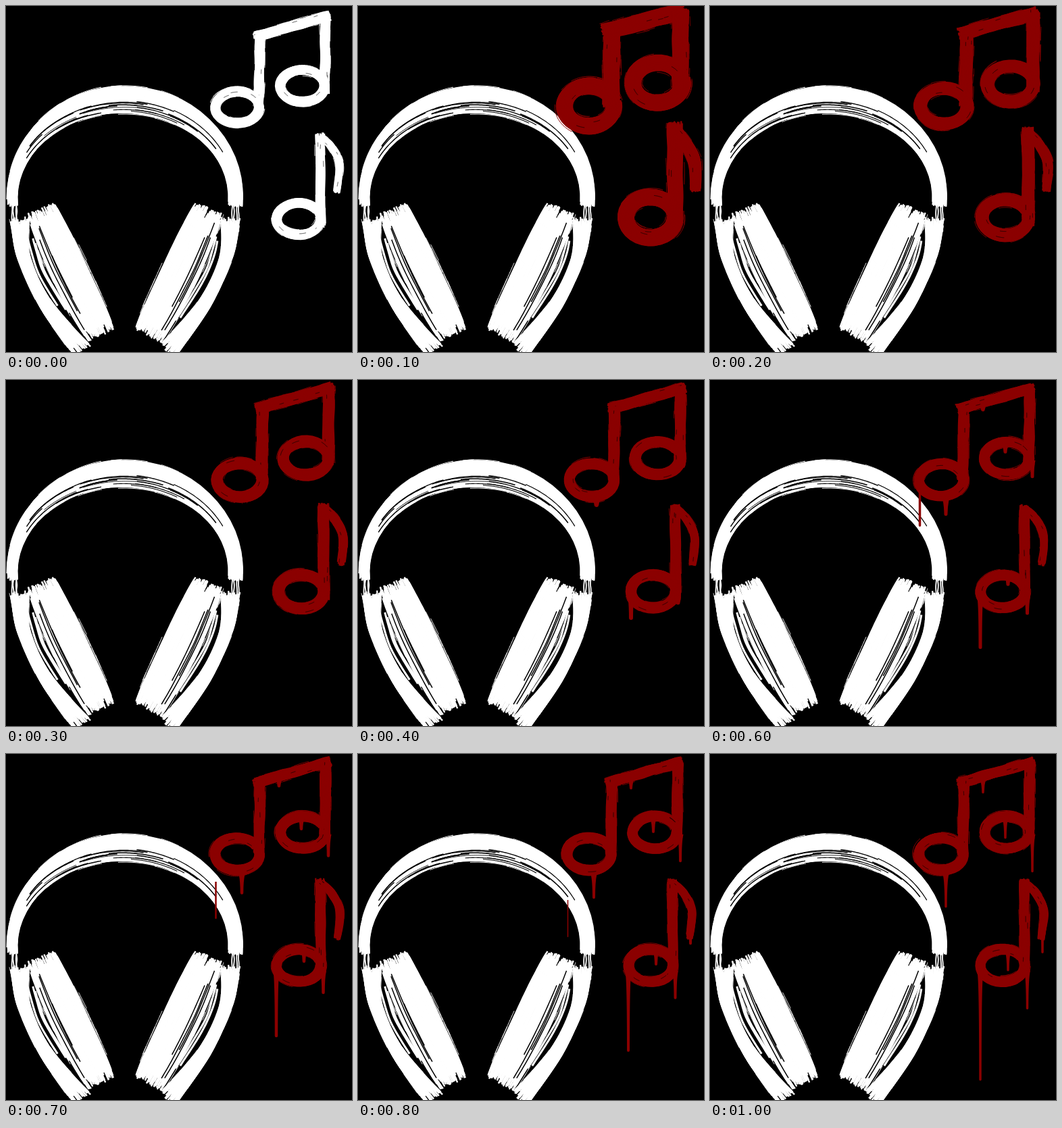
Write an HTML page with a canvas that moves like this. It is 512 by 512 pixels and loops after 1100 ms.

```html
<!DOCTYPE html>
<html>
<head>
<meta charset="utf-8">
<style>
html, body { margin: 0; width: 100%; height: 100%; overflow: hidden; background: #000; }
canvas { display: block; width: 512px; height: 512px; }
</style>
</head>
<body>
<canvas id="stage" width="512" height="512"></canvas>
<script>
const stage = document.getElementById('stage').getContext('2d');
const RED = '#8b0000', WHITE = '#fff', BLACK = '#000';
let ctx, seed;

function rand(low = 0, high = 1) {
  seed = (seed * 16807) % 2147483647;
  return low + (high - low) * seed / 2147483647;
}

// Catmull-Rom curve through the points, t from 0 to 1
function spline(pts) {
  const last = pts.length - 1;
  return t => {
    const f = Math.min(Math.max(t, 0), 1) * last;
    const i = Math.min(Math.floor(f), last - 1), u = f - i;
    const [a, b, c, d] = [i - 1, i, i + 1, i + 2].map(k => pts[Math.min(Math.max(k, 0), last)]);
    return [0, 1].map(k => 0.5 * (2 * b[k] + (c[k] - a[k]) * u
      + (2 * a[k] - 5 * b[k] + 4 * c[k] - d[k]) * u * u
      + (3 * b[k] - a[k] - 3 * c[k] + d[k]) * u * u * u));
  };
}

// Surfaces map t (along the stroke) and u (across it) to a point
function along(pts, w, bulge = 0) {
  const curve = spline(pts);
  return (t, u) => {
    const [x, y] = curve(t), p = curve(t - 0.01), q = curve(t + 0.01);
    const dx = q[0] - p[0], dy = q[1] - p[1];
    const k = (u - 0.5) * w * (1 + bulge * Math.sin(Math.PI * t)) / Math.hypot(dx, dy);
    return [x - dy * k, y + dx * k];
  };
}

function ring(cx, cy, rx, ry, w) {
  return (t, u) => {
    const a = t * 6.6 - 0.4, o = (u - 0.5) * w;
    return [cx + Math.cos(a) * (rx + o), cy + Math.sin(a) * (ry + o)];
  };
}

// Arch between an outer and a flatter inner ellipse
function band(t, u) {
  const a = Math.PI + 0.1 - t * (Math.PI + 0.2);
  return [176 - 3 * u + Math.cos(a) * (174 - 17 * u), 283 - Math.sin(a) * (164 - 39 * u)];
}

function strand(surface, u, from, to, color, width) {
  const n = 32, phase = rand(0, 7), freq = rand(8, 20);
  ctx.strokeStyle = color;
  ctx.lineWidth = width;
  ctx.beginPath();
  for (let i = 0; i <= n; i++) {
    const t = from + (to - from) * i / n;
    const [x, y] = surface(t, u);
    const wave = Math.sin(t * freq + phase) * 0.5;
    ctx.lineTo(x + wave, y + wave);
  }
  ctx.stroke();
}

// Fills a surface with parallel bristles that end unevenly
function brush(surface, n, color, fray, width = 2.3) {
  for (let i = 0; i < n; i++)
    strand(surface, (i + rand()) / n, rand(0, fray), 1 - rand(0, fray), color, width);
}

// Short loose hairs along both edges
function hairs(surface, n, color, spread, span) {
  for (let i = 0; i < n; i++) {
    const from = rand(0, 1 - span), out = rand(0, spread);
    strand(surface, i % 2 ? -out : 1 + out, from, from + span * rand(0.4, 1), color, 1);
  }
}

function drawCup(strands) {
  const pad = along([[51, 298], [92, 390], [142, 489]], 42, 0.3);
  const shell = along([[20, 312], [26, 370], [58, 440], [114, 512]], 30, -0.45);
  const gap = along([[36, 335], [54, 395], [103, 475]], 12);
  for (const part of [pad, shell]) {
    brush(part, 70, WHITE, 0.13);
    hairs(part, 12, WHITE, 0.06, 0.2);
  }
  brush(gap, strands, WHITE, 0.25, 3);
  for (let i = 0; i < 4; i++)
    strand(pad, rand(0.6, 0.95), rand(0.12, 0.4), rand(0.6, 0.9), BLACK, 1.5);
  for (const x of [9, 15])
    brush(along([[x, 285], [x + 1, 335]], 5), 2, WHITE, 0.2, 1.8);
}

function drawHeadphones() {
  seed = 4711;
  brush(band, 75, WHITE, 0.035);
  hairs(band, 24, WHITE, 0.05, 0.12);
  for (let i = 0; i < 22; i++) {
    const from = rand(0.15, 0.65);
    strand(band, rand(0.5, 0.95), from, from + rand(0.06, 0.2), BLACK, rand(0.8, 2));
  }
  drawCup(3);
  ctx.save();
  ctx.translate(352, 0);
  ctx.scale(-1, 1);
  drawCup(2);
  ctx.restore();
}

function drawNotes(step) {
  const color = step ? RED : WHITE;
  const swell = step ? 9 * 0.4 ** (step - 1) : -1;
  const w = 14 + swell, grow = swell / 2;
  seed = 97 + step * 1313;
  const head = (x, y) => ring(x, y, 33 + grow * 0.8, 24 + grow * 1.3, w);
  const stemX = 465 + grow * 0.8;
  const parts = [
    along([[365 - grow, 46 - grow], [481 + grow, 13 - grow]], w),
    along([[376, 40 - grow], [374, 152]], w),
    along([[473 + grow, 10 - grow], [472 + grow, 130]], w),
    head(342, 150), head(439 + grow, 118 - grow / 2), head(433, 315),
    along([[stemX, 186 - 3 * grow], [stemX + 1, 328]], w * 0.95),
    along([[stemX, 191 - 2 * grow], [482 + grow, 208], [494 + grow, 235], [490 + grow * 2, 277]], w * 0.6, 0.3)
  ];
  for (const part of parts) {
    brush(part, Math.round(w * 2), color, 0.07);
    hairs(part, 14, color, 0.13, 0.18);
    for (let i = 0; i < 3; i++) {
      const from = rand(0, 0.9);
      strand(part, rand(0.1, 0.9), from, from + 0.05, BLACK, 0.7);
    }
  }
}

function drip(x, top, bottom, thick, thin) {
  ctx.fillStyle = RED;
  ctx.beginPath();
  ctx.moveTo(x - thick / 2, top);
  ctx.quadraticCurveTo(x - thin / 2, top + 10, x - thin / 2, bottom);
  ctx.arc(x, bottom - thin / 2, thin / 2, Math.PI, 0, true);
  ctx.quadraticCurveTo(x + thin / 2, top + 10, x + thick / 2, top);
  ctx.fill();
}

// x, top, fall per step
const drips = [
  [349, 180, 6.6], [437, 96, 4.2], [477, 121, 7.5], [400, 325, 21.4],
  [441, 292, 4.2], [469.5, 323, 7.6], [404, 38, 3], [492, 249, 6.4]
];

function drawDrips(step) {
  if (step < 3) return;
  for (const [x, top, fall] of drips)
    drip(x, top, top + fall * (step - 2.5), 9, Math.max(3.5, 8 - step * 0.5));
  // This drop lets go of the note, runs off the band and thins out
  if (step > 3 && step < 9) {
    const bottom = 192 + 27 * (step - 5), thin = 9.5 - step;
    drip(310.5, Math.max(158, bottom - 55), bottom, thin, thin);
  }
}

function layer(draw) {
  const canvas = document.createElement('canvas');
  canvas.width = canvas.height = 512;
  ctx = canvas.getContext('2d');
  draw();
  return canvas;
}

const headphones = layer(drawHeadphones);
const poses = Array.from({ length: 11 }, (_, step) => layer(() => {
  ctx.drawImage(headphones, 0, 0);
  ctx.translate(step >= 2 && step <= 5 ? 4 : 0, step ? -2 : 0);
  drawNotes(step);
  drawDrips(step);
}));

function frame() {
  const step = Math.floor(performance.now() % 1100 / 100);
  stage.fillStyle = BLACK;
  stage.fillRect(0, 0, 512, 512);
  stage.drawImage(poses[step], 0, 0);
  requestAnimationFrame(frame);
}
frame();
</script>
</body>
</html>
```
